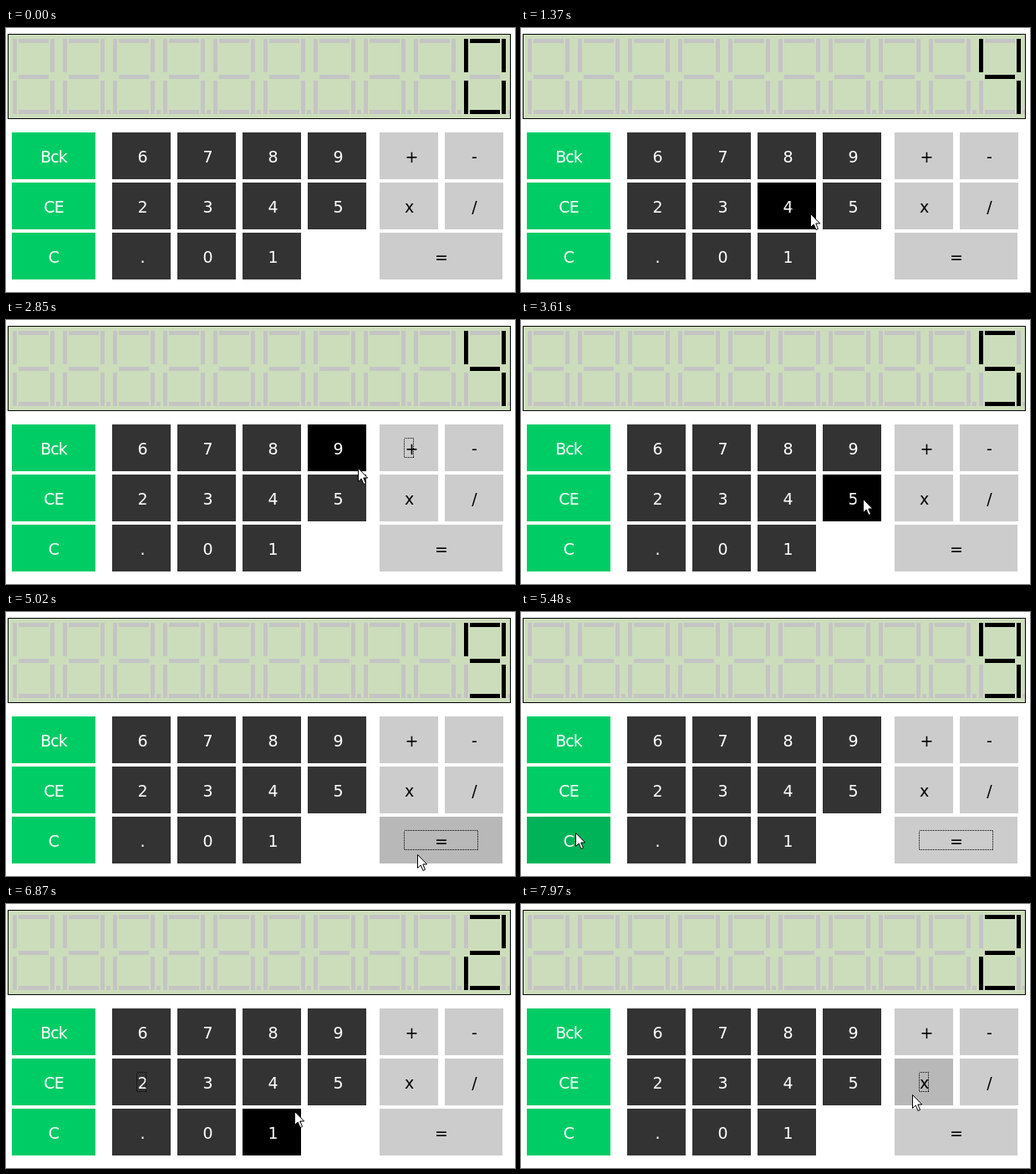
An HTML page that plays this animation: 609 px wide and 316 px high, repeating every 8 s.

```html
<!DOCTYPE html>
<html lang="en">
<head>
<meta charset="utf-8">
<title>Calculator</title>
<style>
html, body { margin: 0; width: 100%; height: 100%; overflow: hidden; background: #fff; }
svg { display: block; width: 609px; height: 316px; }
text { font: 19px "DejaVu Sans", sans-serif; letter-spacing: -1px; text-anchor: middle; }
rect { shape-rendering: crispEdges; }
</style>
</head>
<body>
<svg id="stage" viewBox="0 0 609 316"></svg>
<script>
const LOOP = 8000, TICK = 77, CLICK_DELAY = 120;
const stage = document.getElementById('stage');

function add(name, attrs) {
  const el = document.createElementNS('http://www.w3.org/2000/svg', name);
  for (const key in attrs) el.setAttribute(key, attrs[key]);
  return stage.appendChild(el);
}
const box = (x, y, width, height, fill) => add('rect', { x, y, width, height, fill });

// Display: ten seven-segment digits, only the last one is ever lit
const OFF = '#c4c4c4', TOP = 13;
const DIGITS = { 0: 'abcdef', 2: 'abdeg', 4: 'bcfg', 5: 'acdfg', 9: 'abcdfg' };
const lamps = {};

box(2, 7, 602, 102, '#000');
box(3, 8, 600, 100, '#ccddbb');
for (let left = 8; left < 600; left += 60) {
  [...'agd'].forEach((name, i) =>
    lamps[name] = box(left + 7, TOP + Math.round(42.5 * i), 36, 5, OFF));
  ['fb', 'ec'].forEach((pair, row) => [...pair].forEach((name, col) =>
    lamps[name] = box(left + 45 * col, TOP + 50 * row, 5, 40, OFF)));
  const dot = left + 52;
  box(dot, 98, Math.min(5, 603 - dot), 5, OFF);
}

// Keys
const GREEN = { fill: '#00cc66', hover: '#00b359', ink: '#fff', shift: 0 };
const DARK = { fill: '#333', hover: '#000', ink: '#fff', shift: 1 };
const GREY = { fill: '#ccc', hover: '#b8b8b8', ink: '#000', shift: 0 };
const KEY_HEIGHT = 56;
const keys = {};

function addKey(label, x, row, w, style) {
  const y = 125 + 60 * row;
  const rect = box(x, y, w, KEY_HEIGHT, style.fill);
  // The wide plus sign starts where the narrower labels do
  const shift = label === '+' ? 3 : style.shift;
  add('text', { x: x + w / 2 + shift, y: y + 36, fill: style.ink }).textContent = label;
  keys[label] = { x, y, w, style, rect };
}
function addKeyRows(rows, left, style) {
  rows.forEach((labels, row) => [...labels].forEach((label, col) =>
    addKey(label, left + 78 * col, row, 70, style)));
}
['Bck', 'CE', 'C'].forEach((label, row) => addKey(label, 7, row, 100, GREEN));
addKeyRows(['6789', '2345', '.01'], 127, DARK);
addKeyRows(['+-', 'x/'], 447, GREY);
addKey('=', 447, 2, 147, GREY);

const focusRing = add('rect', {
  fill: 'none', stroke: '#000', 'stroke-dasharray': '1 1', height: 23
});
const pointer = add('path', {
  d: 'M.5.5V16.5L4.2 13 7 19.5 9.5 18.4 6.8 12H11.7Z', fill: '#fff', stroke: '#000'
});

// Pointer moves; a move with a key ends in a click on it
const START = { x: 411, y: 300 };
const MOVES = [
  { leave: 450, arrive: 1020, x: 346, y: 222, key: '4', shows: 4 },
  { leave: 1450, arrive: 1880, x: 485, y: 163, key: '+', shows: 4 },
  { leave: 2230, arrive: 2920, x: 419, y: 177 },
  { leave: 2920, arrive: 3260, x: 409, y: 214, key: '5', shows: 5 },
  { leave: 3690, arrive: 3960, x: 492, y: 290, key: '=', shows: 9 },
  { leave: 5020, arrive: 5480, x: 65, y: 264, key: 'C', shows: 0 },
  { leave: 6270, arrive: 6480, x: 165, y: 224, key: '2', shows: 2 },
  { leave: 6650, arrive: 6870, x: 345, y: 248 },
  { leave: 6950, arrive: 7220, x: 486, y: 221, key: 'x', shows: 2 },
  { leave: 7740, arrive: 7970, x: 468, y: 228 }
];
const smooth = p => p * p * (3 - 2 * p);

function pointerAt(time) {
  const i = MOVES.findLastIndex(move => move.leave <= time);
  if (i < 0) return null;
  const from = MOVES[i - 1] || START, to = MOVES[i];
  // The pointer advances in whole ticks and then rests
  const ticked = Math.floor((time - to.leave) / TICK) * TICK;
  const p = time >= to.arrive ? 1 : smooth(ticked / (to.arrive - to.leave));
  const mix = axis => Math.round(from[axis] + (to[axis] - from[axis]) * p);
  return { x: mix('x'), y: mix('y') };
}

function draw(time) {
  const tip = pointerAt(time);
  pointer.style.display = tip ? '' : 'none';
  if (tip) pointer.setAttribute('transform', `translate(${tip.x} ${tip.y})`);

  for (const { x, y, w, style, rect } of Object.values(keys)) {
    const over = tip && tip.x >= x && tip.x < x + w && tip.y >= y && tip.y < y + KEY_HEIGHT;
    rect.setAttribute('fill', over ? style.hover : style.fill);
  }

  const click = MOVES.findLast(move => move.key && move.arrive + CLICK_DELAY <= time);
  const lit = DIGITS[click ? click.shows : 0];
  for (const name in lamps)
    lamps[name].setAttribute('fill', lit.includes(name) ? '#000' : OFF);

  focusRing.style.display = click ? '' : 'none';
  if (click) {
    const { x, y, w } = keys[click.key];
    focusRing.setAttribute('x', x + 29.5);
    focusRing.setAttribute('y', y + 16.5);
    focusRing.setAttribute('width', w - 59);
  }
}

const start = performance.now();
function frame() {
  draw((performance.now() - start) % LOOP);
  requestAnimationFrame(frame);
}
frame();
</script>
</body>
</html>
```
